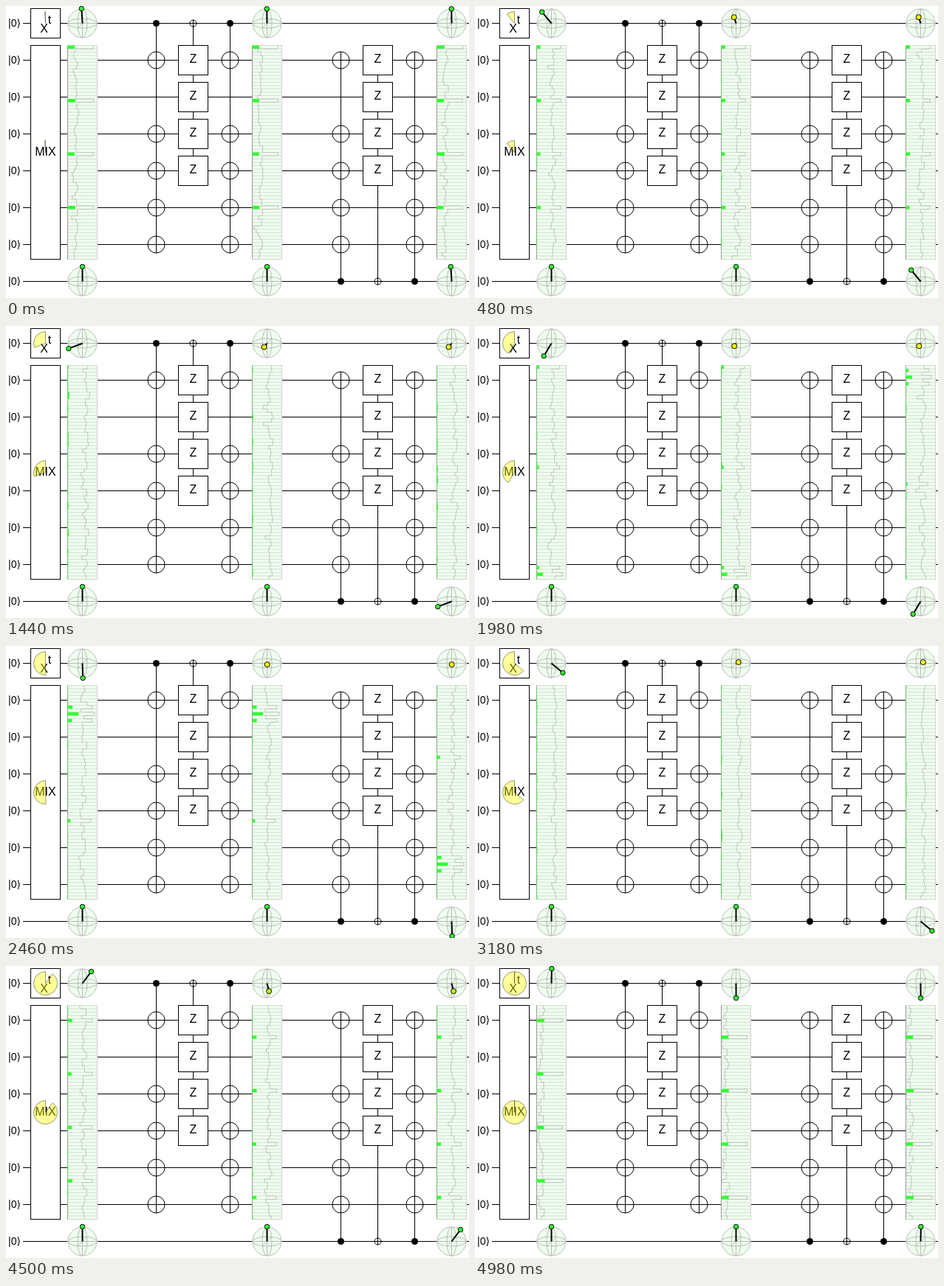
Recreate the animation shown at these times as an HTML page with a canvas. Size 627 by 396 pixels, loop 5040 ms.

```html
<!DOCTYPE html>
<html lang="en">
<head>
<meta charset="utf-8">
<title>Quantum circuit</title>
<style>
html, body { margin: 0; width: 100%; height: 100%; overflow: hidden; background: #fff; }
canvas { display: block; }
</style>
</head>
<body>
<canvas id="stage" width="627" height="396"></canvas>
<script>
const ctx = document.getElementById('stage').getContext('2d');
const STEPS = 84, STEP_MS = 60, TAU = Math.PI * 2;
const ROWS = 64, TOP = 53.5, HEIGHT = 290, WIDTH = 40, ROW_H = HEIGHT / ROWS;
const FONT = '"Liberation Sans", Arial, sans-serif';
const wireY = n => 23.5 + 50 * n;

// end: comb offset as the turn closes; peak, drift: row of the half-turn peak and its speed.
const DISPLAYS = [
  { end: 4, peak: 8, drift: 110 },
  { end: 9, peak: 8, drift: 110 },
  { end: 9, peak: 53, drift: -154 }
];

const hash = n => { const s = Math.sin(n * 12.9898 + 4.1) * 43758.5453; return s - Math.floor(s); };

// Exponentially distributed noise, smooth in time.
function noise(row, seed, turn) {
  const pos = turn * 10, knot = Math.floor(pos), f = pos - knot;
  const at = k => -Math.log(hash(row + 71 * k + 997 * seed) + 1e-4);
  return at(knot) * (1 - f) + at(knot + 1) * f;
}

// A comb of four rows dissolves into noise, gathers into a moving peak, and returns as a comb.
function probabilities({ end, peak, drift }, seed, turn) {
  const spread = Math.min(1, 1.8 * Math.sin(Math.PI * turn) ** 1.2);
  const offset = turn < 0.5 ? 0 : end;
  const focus = 0.4 * Math.exp(-(((turn - 0.48) / 0.08) ** 2));
  const centre = Math.round(peak + drift * (turn - 0.505));
  return Array.from({ length: ROWS }, (_, row) => {
    const hum = (noise(row, seed, turn) + noise(row + 1, seed, turn)) / 2;
    const comb = row % 16 === offset ? 0.23 + 0.05 * hash(row + seed) : 0;
    const away = (((row - centre) % ROWS) + ROWS) % ROWS;
    const lobe = away === 0 ? 1 : away === 2 || away === ROWS - 2 ? 0.4 : away === 32 ? 0.25 : 0;
    return spread * (1 - 1.5 * focus) * hum / ROWS + (1 - spread) * comb + focus * lobe;
  });
}

function line(points, color = '#000', width = 1) {
  ctx.beginPath();
  points.forEach(([x, y]) => ctx.lineTo(x, y));
  ctx.strokeStyle = color;
  ctx.lineWidth = width;
  ctx.stroke();
}

function oval(x, y, rx, ry, stroke, fill) {
  ctx.beginPath();
  ctx.ellipse(x, y, rx, ry, 0, 0, TAU);
  if (fill) { ctx.fillStyle = fill; ctx.fill(); }
  if (stroke) { ctx.strokeStyle = stroke; ctx.lineWidth = 1; ctx.stroke(); }
}

function text(str, x, baseline, size = 16, align = 'center') {
  ctx.font = `${size}px ${FONT}`;
  ctx.textAlign = align;
  ctx.fillStyle = '#000';
  ctx.fillText(str, x, baseline);
}

function box(x, y, h = 40) {
  ctx.fillStyle = '#fff';
  ctx.fillRect(x - 20, y, 40, h);
  ctx.strokeStyle = '#000';
  ctx.lineWidth = 1;
  ctx.strokeRect(x - 20, y, 40, h);
}

function plus(x, y, r, fill) {
  oval(x, y, r, r, '#000', fill);
  line([[x - r, y], [x + r, y]]);
  line([[x, y - r], [x, y + r]]);
}

function flips(x, control) {
  line([[x, wireY(Math.min(control, 1))], [x, wireY(Math.max(control, 6))]]);
  oval(x, wireY(control), 4.5, 4.5, null, '#000');
  for (const n of [1, 3, 4, 5, 6]) plus(x, wireY(n), 11.5);
}

function phases(x, control) {
  line([[x, wireY(Math.min(control, 1))], [x, wireY(Math.max(control, 4))]]);
  plus(x, wireY(control), 4.5, '#fff');
  for (let n = 1; n <= 4; n++) {
    box(x, wireY(n) - 20);
    text('Z', x, wireY(n) + 4.5 - 1);
  }
}

function pie(x, y, turn) {
  ctx.beginPath();
  ctx.moveTo(x, y);
  ctx.arc(x, y, 16, -TAU / 4, -TAU / 4 - turn * TAU, true);
  ctx.closePath();
  ctx.globalAlpha = 0.4;
  ctx.fillStyle = '#ff0';
  ctx.fill();
  ctx.strokeStyle = '#000';
  ctx.lineWidth = 1;
  ctx.stroke();
  ctx.globalAlpha = 1;
}

function sphere(x, y, [dx, dy]) {
  const grey = '#bbb';
  oval(x, y, 19.5, 19.5, grey, '#efe');
  oval(x, y, 19.5, 6.5, grey);
  oval(x, y, 6.5, 19.5, grey);
  line([[x - 20, y], [x + 20, y]], grey);
  line([[x, y - 20], [x, y + 20]], grey);
  line([[x - 6.5, y + 6.5], [x + 6.5, y - 6.5]], grey);
  line([[x, y], [x + dx, y + dy]], '#000', 2);
  const mix = Math.min(1, (20 - Math.min(20, Math.hypot(dx, dy))) / 12);
  const r = 3.2 + 0.3 * mix;
  oval(x + dx, y + dy, r, r, '#000', `rgb(${51 + 204 * mix}, 255, ${51 - 51 * mix})`);
}

function chances(x, probs) {
  ctx.fillStyle = '#efe';
  ctx.fillRect(x, TOP, WIDTH, HEIGHT);
  const curve = [];
  probs.forEach((p, row) => {
    const y = TOP + row * ROW_H;
    const cx = x + WIDTH * Math.max(0, 1 + Math.log2(p) / 16);
    line([[x, y], [x + WIDTH, y]], '#d8dcd8');
    curve.push([cx, y], [cx, y + ROW_H]);
  });
  line(curve, '#c0c4c0');
  ctx.strokeStyle = '#d3d3d3';
  ctx.strokeRect(x, TOP, WIDTH, HEIGHT);
  line([[x, TOP], [x, TOP + HEIGHT]], '#999');
  ctx.fillStyle = '#3f3';
  probs.forEach((p, row) => ctx.fillRect(x, TOP + row * ROW_H, WIDTH * p, ROW_H));
}

function draw(step) {
  const turn = (step + 1.1 + 0.8 * Math.sin((step - 5) / STEPS * TAU)) / STEPS;
  const angle = turn * TAU;
  const up = [0, -20];
  const spin = [-20 * Math.sin(angle), -20 * Math.cos(angle)];
  const mixed = [
    -4.3 * Math.sin(angle),
    -20 * Math.cos(angle / 2) ** 9 + 4 * Math.sin(angle) + 1.7 * Math.sin(angle / 2)
  ];

  ctx.fillStyle = '#fff';
  ctx.fillRect(0, 0, 627, 396);
  for (let n = 0; n < 8; n++) {
    line([[23, wireY(n)], [627, wireY(n)]]);
    text('|0⟩', 20, wireY(n) + 4.5, 14, 'right');
  }

  box(53.5, 3.5);
  text('X', 51.5, 36);
  text('t', 59, 24);
  pie(53.5, 23.5, turn);
  box(53.5, TOP, HEIGHT);
  text('MIX', 53.5, 203);
  pie(53.5, 198.5, turn);

  flips(203.5, 0);
  phases(253.5, 0);
  flips(303.5, 0);
  flips(453.5, 7);
  phases(503.5, 7);
  flips(553.5, 7);

  [[spin, up], [mixed, up], [mixed, spin]].forEach(([first, last], d) => {
    const x = 103.5 + 250 * d;
    chances(x - 20, probabilities(DISPLAYS[d], d, turn));
    sphere(x, wireY(0), first);
    sphere(x, wireY(7), last);
  });
}

const start = performance.now();
function tick() {
  draw(Math.floor((performance.now() - start) / STEP_MS) % STEPS);
  requestAnimationFrame(tick);
}
tick();
</script>
</body>
</html>
```
